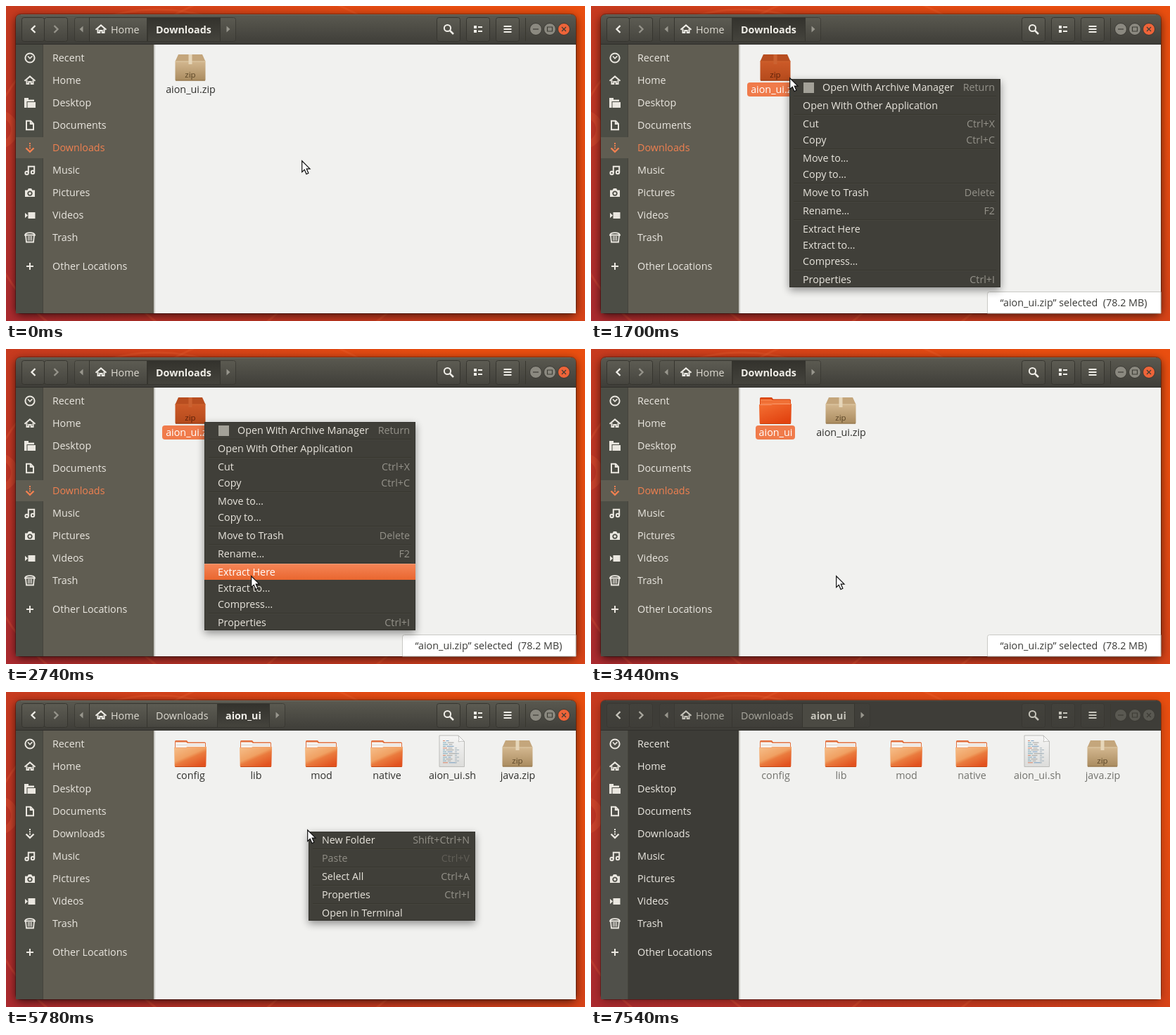
An HTML page that plays this animation: 823x449 px, repeating every 8900 ms.

```html
<!DOCTYPE html>
<html lang="en">
<head>
<meta charset="utf-8">
<title>Extracting an archive</title>
<style>
html, body { margin: 0; width: 100%; height: 100%; overflow: hidden; background: #c23a1e; }
svg { display: block; width: 823px; height: 449px; }
text { font: 14.3px "Open Sans", "Noto Sans", sans-serif; white-space: pre; }
.b { font-weight: bold; }
.s { fill: none; stroke: currentColor; stroke-width: 2; }
.f { fill: currentColor; }
</style>
</head>
<body>
<svg viewBox="0 0 823 449" xmlns="http://www.w3.org/2000/svg">
  <defs>
    <linearGradient id="wall" x1="0" y1="1" x2="1" y2=".35">
      <stop offset="0" stop-color="#a92a2f"/><stop offset=".45" stop-color="#c63a1f"/><stop offset="1" stop-color="#e94e10"/>
    </linearGradient>
    <linearGradient id="head" x2="0" y2="1"><stop stop-color="#5a5950"/><stop offset="1" stop-color="#3e3d38"/></linearGradient>
    <linearGradient id="btn" x2="0" y2="1"><stop stop-color="#5d5c53"/><stop offset="1" stop-color="#46453f"/></linearGradient>
    <linearGradient id="down" x2="0" y2="1"><stop stop-color="#33322d"/><stop offset="1" stop-color="#45443d"/></linearGradient>
    <linearGradient id="hot" x2="0" y2="1"><stop stop-color="#f58658"/><stop offset="1" stop-color="#e9662f"/></linearGradient>
    <linearGradient id="zip" x2="0" y2="1"><stop stop-color="#d3b78f"/><stop offset="1" stop-color="#a98b5f"/></linearGradient>
    <linearGradient id="zipOn" x2="0" y2="1"><stop stop-color="#cc5a28"/><stop offset="1" stop-color="#b54a1c"/></linearGradient>
    <linearGradient id="dir" x2=".7" y2="1"><stop stop-color="#f6c08c"/><stop offset=".5" stop-color="#f0a062"/><stop offset=".62" stop-color="#ea7b3e"/><stop offset="1" stop-color="#e2521f"/></linearGradient>
    <linearGradient id="dirOn" x2=".6" y2="1"><stop stop-color="#f47134"/><stop offset="1" stop-color="#e24310"/></linearGradient>
    <linearGradient id="page" x2="0" y2="1"><stop stop-color="#f6f6f5"/><stop offset="1" stop-color="#dcdcda"/></linearGradient>
    <filter id="blur" x="-10%" y="-10%" width="120%" height="120%"><feGaussianBlur stdDeviation="6.5"/></filter>
    <filter id="soft" x="-20%" y="-20%" width="140%" height="140%"><feGaussianBlur stdDeviation="6"/></filter>
  </defs>
  <rect width="823" height="449" fill="url(#wall)"/>
  <g fill="none" stroke="#f2703c" stroke-opacity=".22" stroke-width="3">
    <circle cx="215" cy="255" r="250"/><circle cx="370" cy="240" r="262"/><circle cx="-10" cy="176" r="22" stroke-width="10"/>
  </g>
  <g id="stage"></g>
</svg>
<script>
const LOOP = 8900, LIGHT = '#eae7e0', stage = document.getElementById('stage');

// [start, end, steps, x, y]: pointer moves in held steps
const moves = [
  [360, 360, 1, 396, 191], [500, 620, 2, 298, 121], [760, 920, 5, 280, 102],
  [1700, 1700, 1, 282, 102], [1720, 1720, 1, 285, 122], [1860, 2260, 10, 338, 338],
  [2500, 2740, 4, 348, 323], [3860, 4340, 5, 279, 93], [4480, 4600, 2, 250, 108],
  [5280, 5460, 3, 427, 190], [5620, 5620, 1, 428, 196], [6100, 6600, 8, 468, 298],
  [6640, 6640, 1, 467, 303], [6700, 6700, 1, 466, 306], [6840, 6840, 1, 463, 313]
];

const steps = (t, a, b, n) =>
  t < a ? 0 : n < 2 ? 1 : Math.min(n, 1 + Math.floor((t - a) / (b - a) * (n - 1) + 1e-6)) / n;

function pointer(t) {
  let x = 420, y = 220;
  for (const [a, b, n, nx, ny] of moves) {
    let k = steps(t, a, b, n);
    if (n > 3) k = k * k * (3 - 2 * k);
    x += (nx - x) * k;
    y += (ny - y) * k;
    if (k < 1) break;
  }
  return [Math.round(x), Math.round(y)];
}

function mix(a, b, p) {
  const part = (h, i) => parseInt(h.slice(i, i + 2), 16);
  return `rgb(${[1, 3, 5].map(i => Math.round(part(a, i) + (part(b, i) - part(a, i)) * p))})`;
}

const rect = (x, y, w, h, fill, more = '') => `<rect x="${x}" y="${y}" width="${w}" height="${h}" fill="${fill}" ${more}/>`;
const path = (d, cls = 's', more = '') => `<path d="${d}" class="${cls}" ${more}/>`;
const ring = (x, y, r, cls = 's') => `<circle cx="${x}" cy="${y}" r="${r}" class="${cls}"/>`;
const text = (x, y, s, fill, more = '') => `<text x="${x}" y="${y}" fill="${fill}" ${more}>${s}</text>`;
const at = (x, y, body, color = LIGHT) => `<g transform="translate(${x} ${y})" color="${color}">${body}</g>`;

const house = path('M-7.5 .8L0 -5.6L7.5 .8') + path('M-4.5 -.5V5H-1.7V2H1.7V5H4.5V-.5');
const places = [
  ['Recent', ring(0, 0, 6.6) + path('M-3 -2.5L0 .8L3.4 -2.6', 's', 'style="stroke-width:1.6"')],
  ['Home', house],
  ['Desktop', path('M-8 -7H-2V-4.5H6V-2H-4.5V7H-8ZM-3.5 -1H8V7H-3.5Z', 'f')],
  ['Documents', path('M-5 -6.2H1L5 -2.2V6.2H-5ZM.8 -6V-2H5')],
  ['Downloads', path('M0 -7V1.5', 's', 'stroke-dasharray="2 1.2"') + path('M-5.5 .5L0 5.8L5.5 .5', 's', 'style="stroke-width:2.4"')],
  ['Music', path('M-2.2 4V-5.3H6.2V2.8') + ring(-4.4, 4, 2.2) + ring(4, 3, 2.2)],
  ['Pictures', path('M-7 -3.5H-3.5L-2 -6H2L3.5 -3.5H7V6H-7ZM0 -2.6A3.7 3.7 0 1 0 .01 -2.6Z', 'f', 'fill-rule="evenodd"') + ring(0, 1.1, 1.9, 'f')],
  ['Videos', path('M-2.5 -4H7.5V5H-2.5ZM-3 .5L-7 -3.2V4.2Z', 'f')],
  ['Trash', path('M-7 -3.5C-6 -8 6 -8 7 -3.5ZM-6 -3L-5 6.5H5L6 -3', 's', 'style="stroke-width:1.8"') + path('M-2.3 -2V4.5M0 -2V4.5M2.3 -2V4.5', 's', 'style="stroke-width:1.2"')],
  ['Other Locations', path('M-5 0H5M0 -5V5')]
];

const fileMenu = { x: 282, y: 104, w: 300, h: 297, rows: [
  [116, 'Open With Archive Manager', 'Return'], [142, 'Open With Other Application'],
  [168, 'Cut', 'Ctrl+X'], [191, 'Copy', 'Ctrl+C'], [217, 'Move to…'], [240, 'Copy to…'],
  [266, 'Move to Trash', 'Delete'], [292, 'Rename…', 'F2'], [318, 'Extract Here'],
  [341, 'Extract to…'], [364, 'Compress…'], [390, 'Properties', 'Ctrl+I']] };
const folderMenu = { x: 430, y: 199, w: 237, h: 127, rows: [
  [211, 'New Folder', 'Shift+Ctrl+N'], [237, 'Paste', 'Ctrl+V'], [263, 'Select All', 'Ctrl+A'],
  [289, 'Properties', 'Ctrl+I'], [315, 'Open in Terminal']] };

function menu({ x, y, w, h, rows }, px, py) {
  let out = rect(x, y + 4, w, h, '#000', 'opacity=".42" filter="url(#soft)"') +
    rect(x + .5, y + .5, w - 1, h - 1, '#403f39', 'stroke="#35342f"');
  rows.forEach(([c, name, key], i) => {
    const off = name === 'Paste';
    const hot = !off && px >= x && py >= c - 12 && py < c + 11;
    if (i && c - rows[i - 1][0] > 23)
      out += rect(x + 6, c - 14, w - 12, 1, '#38372f') + rect(x + 6, c - 13, w - 12, 1, '#45443d');
    if (hot) out += rect(x, c - 12, w, 23, 'url(#hot)') + rect(x, c - 12, w, 1, '#f79a73');
    const first = key === 'Return';
    if (first) out += rect(x + 20, c - 7, 15, 15, '#a3a198');
    out += text(x + (first ? 47 : 19), c + 5, name, hot ? '#fff' : off ? '#8f8d85' : '#e8e5dd');
    if (key) out += text(x + w - 8, c + 5, key, hot ? '#fbe9e0' : off ? '#605e57' : '#94928a', 'text-anchor="end"');
  });
  return out;
}

const box = on => {
  const ink = on ? '#5c2109' : '#5a4526';
  return `<path d="M-17 -19H17L21.5 -9H-21.5Z" fill="${on ? '#b84e20' : '#c4a67c'}"/>` +
    `<path d="M-21.5 -9H21.5V17Q21.5 18.5 20 18.5H-20Q-21.5 18.5 -21.5 17Z" fill="url(#${on ? 'zipOn' : 'zip'})"/>` +
    rect(-21.5, -9.5, 43, 1, on ? '#d0642f' : '#e2cda9') + rect(-2.5, -19, 5, 14, on ? '#cb6231' : '#e6d6b9') +
    text(0, 14, 'zip', ink, 'text-anchor="middle" style="font-size:11.5px"') +
    rect(-21, 17.5, 42, 1, on ? '#8f3610' : '#8f7248');
};

const folder = on =>
  `<path d="M-22 18V-17.5Q-22 -19 -20.5 -19H-5L-3 -16.5H20.5Q22 -16.5 22 -15V18Z" fill="${on ? '#d9440f' : '#e2703f'}"/>` +
  `<path d="M-21 -8V-16.5H-6L-4 -15H21V-8Z" fill="${on ? '#f4793f' : '#f7f3ef'}"/>` +
  rect(-20.5, -13, 41, 1, on ? '#e85e24' : '#ddd6d0') +
  `<path d="M-23 -9H-6L-4 -10H23L22.3 17.5Q22.2 19 20.5 19H-20.5Q-22.2 19 -22.3 17.5Z" fill="url(#${on ? 'dirOn' : 'dir'})"/>` +
  `<path d="M-22.4 -8.5H-5.8L-3.8 -9.5H22.4" fill="none" stroke="${on ? '#f79266' : '#f3a877'}"/>` +
  rect(-21.5, 18, 43, 1, '#c4440f');

const script = () => {
  let out = '<path d="M-18 -26H9L17.5 -17.5V18.5H-18Z" fill="url(#page)" stroke="#bcbcb9"/>' +
    '<path d="M9 -26Q11 -20 9 -17Q13 -18.5 17.5 -17.5Z" fill="#fff" stroke="#b4b4b1" stroke-width=".8"/>';
  for (let i = 0; i < 13; i++) {
    const y = -19 + i * 2.6, a = 3 + i * 7 % 5, b = 4 + i * 5 % 9;
    out += rect(-13, y, a, 1.1, i % 4 ? '#86aebf' : '#d58a72') +
      rect(-11.5 + a, y, Math.min(b, 19 - a), 1.1, i % 3 ? '#a9a9a5' : '#7fa3c4');
    if (i > 3) out += rect(4, y, 3 + i * 3 % 6, 1.1, '#a8b7c0');
  }
  return out;
};

// One grid cell: icon with its label underneath
function item(i, name, draw, on, hover, ink = '#30302d', pill = 80) {
  const x = 262 + 93 * i;
  return `<g style="${hover ? 'filter:brightness(1.12)' : ''}">${at(x, 88, draw(on))}</g>` +
    (on ? rect(x - pill / 2, 109, pill, 20, '#f07b4b', 'rx="4"') : '') +
    text(x + .5, 124, name, on ? '#fff' : ink, 'text-anchor="middle"');
}

function files(t, p) {
  const zip = 'aion_ui.zip', ui = 'aion_ui';
  if (t < 3120) return item(0, zip, box, t >= 920, t >= 620 && t < 1240);
  if (t < 4920) {
    const on = t >= 3440;
    return item(0, ui, folder, on, t >= 4340, undefined, 56) + item(1, zip, box, !on);
  }
  const ink = mix('#30302d', '#72726d', p);
  return ['config', 'lib', 'mod', 'native'].map((n, i) => item(i, n, folder, false, !i && t < 5280, ink)).join('') +
    item(4, 'aion_ui.sh', script, false, false, ink) + item(5, 'java.zip', box, false, false, ink);
}

function header(t, p) {
  const edge = '#36352f', fade = 1 - .85 * p, ink = mix('#dfdcd3', '#aaa89f', p), icon = mix('#f0eee8', '#c6c4bb', p);
  const button = (x, w, r = 0) => rect(x + .5, 16.5, w, 34, 'url(#btn)', `rx="${r}" fill-opacity="${fade}" stroke="${edge}" stroke-opacity="${1 - .4 * p}"`);
  const crumb = (x, w, name, on, tx) =>
    (on ? rect(x + .5, 16.5, w, 34, 'url(#down)', `stroke="${edge}"`) + rect(x + 1, 17, w - 1, 33, '#4b4a43', `opacity="${p}"`) : button(x, w)) +
    text(tx, 39, name, on ? mix('#f0eee8', '#c6c4bb', p) : ink, on ? 'class="b"' : '');
  const inside = t >= 4920, end = inside ? 374 : 304;
  let out = `<path d="M14 55V19Q14 12 21 12H803Q810 12 810 19V55Z" fill="url(#head)"/>` +
    `<path d="M14 55V19Q14 12 21 12H803Q810 12 810 19V55Z" fill="#3e3d38" opacity="${p}"/>` +
    rect(21, 12, 782, 1, '#706e64', `opacity="${1 - .7 * p}"`) + rect(14, 54, 796, 1, '#302f2b');
  out += button(22, 32, 3) + button(54, 33, 3);
  out += `<g opacity=".7">${button(97, end - 75, 3)}</g>`;
  out += at(39, 33, path('M2.5 -5L-2.5 0L2.5 5', 's', 'style="stroke-width:2.3"'), icon) +
    at(71, 33, path('M-2.5 -5L2.5 0L-2.5 5', 's', 'style="stroke-width:2.3"'), mix('#96948b', '#aaa89f', p));
  out += at(107, 33, path('M2.5 -4.5L-2.5 0L2.5 4.5Z', 'f'), '#98968d') + at(end + 12, 33, path('M-2.5 -4.5L2.5 0L-2.5 4.5Z', 'f'), '#98968d');
  out += crumb(118, 82, 'Home', false, 149) + at(135, 33, house, icon);
  out += inside ? crumb(200, 100, 'Downloads', false, 213) + crumb(300, 74, 'aion_ui', true, 312) : crumb(201, 103, 'Downloads', true, 213);
  for (const x of [612, 654, 696]) out += button(x, 33, 3);
  out += at(629, 33, ring(-1.5, -1.5, 4.6) + path('M1.8 1.8L7 7', 's', 'style="stroke-width:2.5"'), icon) +
    at(671, 33, path('M-6 -5H-2V-1H-6ZM-6 1H-2V5H-6ZM0 -4H6V-2H0ZM0 2H6V4H0Z', 'f'), icon) +
    at(713, 33, path('M-5.5 -4H5.5M-5.5 0H5.5M-5.5 4H5.5'), icon) +
    rect(738, 17, 1, 33, '#38372f', `opacity="${1 - p * .6}"`);
  ['M-4 0H4', 'M-3.5 -3H3.5V3H-3.5Z', 'M-3 -3L3 3M3 -3L-3 3'].forEach((d, i) => {
    const fill = mix(i > 1 ? '#ee6439' : '#8b8980', '#5a5952', p);
    out += at(753 + 20 * i, 33, `<circle r="8.5" fill="${fill}" stroke="#3a3933"/>` + path(d, 's', 'style="stroke-width:1.2"'), '#3d3c35');
  });
  return out;
}

function sidebar(p, q) {
  let out = rect(14, 55, 39, 383, mix('#4c4d45', '#50504a', p)) + rect(53, 55, 157, 383, mix('#605d52', '#3d3c37', p)) +
    rect(52, 55, 1, 383, '#45443d') + rect(14, 187, 39, 30, '#605d52', `opacity="${1 - q}"`) + rect(210, 55, 2, 383, '#c9c8c3');
  places.forEach(([name, icon], i) => {
    const y = i < 9 ? 74 + 32 * i : 371, ink = i === 4 ? mix('#f08050', LIGHT, q) : LIGHT;
    out += at(34, y, icon, ink) + text(66, y + 5, name, ink);
  });
  return out;
}

function status(t) {
  if (t < 1180 || t >= 4920) return '';
  const late = t >= 3700, x = late ? 525 : 563;
  return `<path d="M${x + .5} 438V410.5Q${x + .5} 407.5 ${x + 3.5} 407.5H810V438Z" fill="#fff" stroke="#c9c9c5"/>` +
    text(790.5, 428, late ? '“aion_ui” selected  (containing 1 item)' : '“aion_ui.zip” selected  (78.2 MB)', '#3a3a37', 'text-anchor="end"');
}

function scene(t) {
  const p = steps(t, 7280, 7540, 8), q = steps(t, 4920, 5100, 5), [x, y] = pointer(t);
  let out = rect(14, 15, 796, 426, '#000', `rx="7" opacity="${.66 - .34 * p}" filter="url(#blur)"`) +
    rect(13.5, 11.5, 797, 427, 'none', 'rx="7" stroke="#000" stroke-opacity=".3"') +
    rect(210, 55, 600, 383, '#f1f1ef') + header(t, p) + sidebar(p, q) + files(t, p) + status(t);
  if (t >= 1240 && t < 2980) out += menu(fileMenu, t < 1720 ? -1 : x, y);
  if (t >= 5780 && t < 7100) out += menu(folderMenu, x, y);
  if (t < 7280)
    out += at(x, y, '<path d="M.7 .8V16.6L4.3 13.2L7 19.6L9.9 18.3L7.2 12.1H12Z" fill="#fff" stroke="#111" stroke-width="1.2"/>');
  return out;
}

let shown = '';
function frame(now) {
  const next = scene(now % LOOP);
  if (next !== shown) stage.innerHTML = shown = next;
  requestAnimationFrame(frame);
}
frame(performance.now());
</script>
</body>
</html>
```
